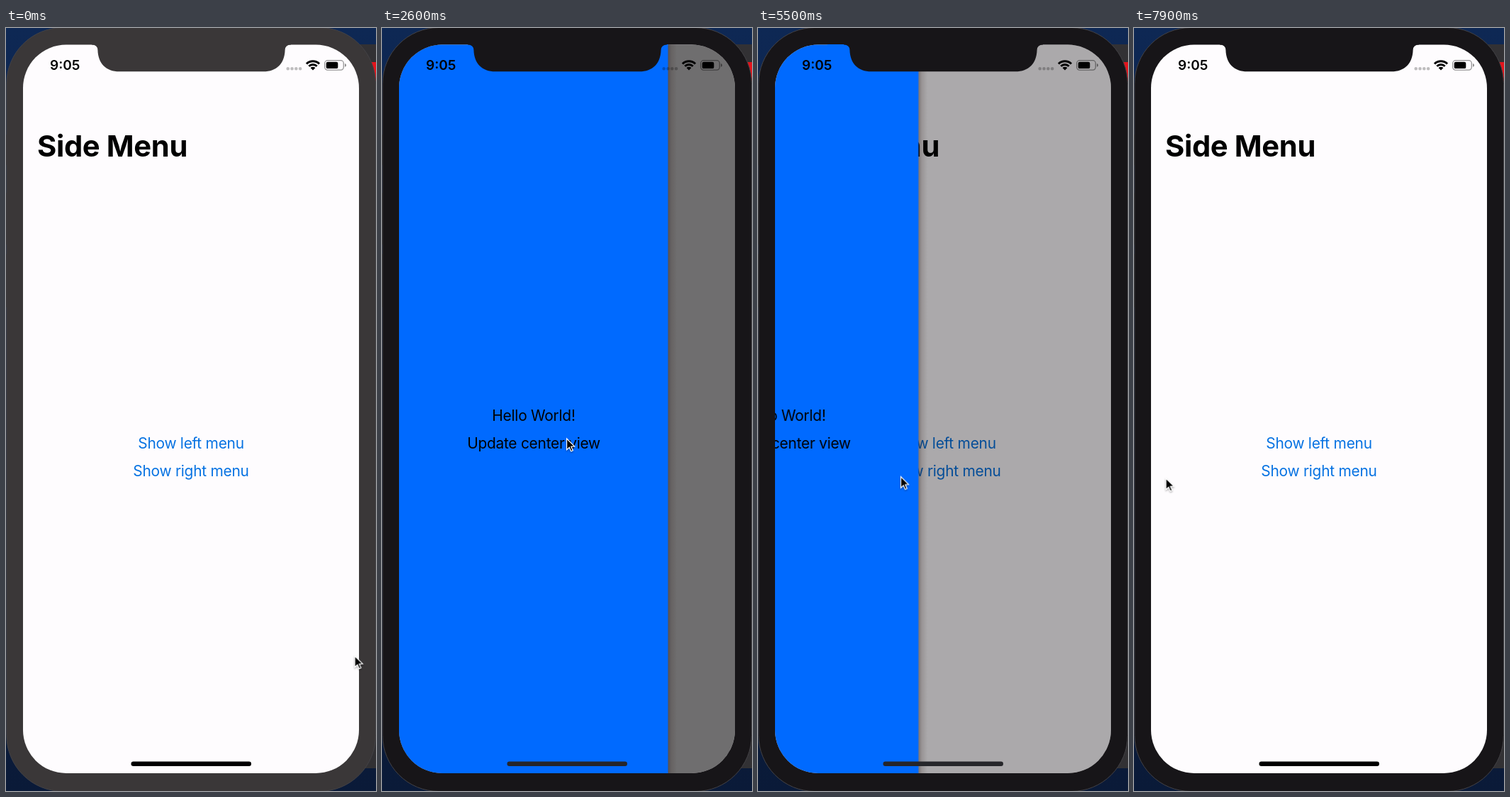
An HTML page that plays this animation: 522x1074 px, repeating every 8000 ms.

```html
<!DOCTYPE html>
<html lang="en">
<head>
<meta charset="utf-8">
<title>Side menu</title>
<style>
  html, body { margin: 0; width: 100%; height: 100%; overflow: hidden; background: #0b1d40; }
  svg { display: block; width: 522px; height: 1074px; font-family: Inter, "Open Sans", sans-serif; }
  .body { font-size: 20.9px; letter-spacing: -.25px; text-anchor: middle; }
  .link { fill: #0672e2; }

  .bezel, .menu, .dim, .home, .cursor { animation: 8s linear infinite; }
  .bezel  { animation-name: bezel; }
  .menu   { animation-name: menu; }
  .dim    { animation-name: dim; }
  .home   { animation-name: home; }
  .cursor { animation-name: cursor; }

  /* The window gains focus on the first click. */
  @keyframes bezel {
    0%, 26.24% { fill: #3a3738; }
    26.25%, 100% { fill: #171518; }
  }
  @keyframes menu {
    0%, 26.875% { transform: translateX(-396px); animation-timing-function: ease-in-out; }
    31.25%, 56.25% { transform: translateX(0); }
    68.75% { transform: translateX(-177px); }
    78.75% { transform: translateX(-323px); }
    83.75% { transform: translateX(-358px); animation-timing-function: ease-out; }
    87.5%, 100% { transform: translateX(-396px); }
  }
  @keyframes dim {
    0%, 26.875% { opacity: 0; animation-timing-function: ease-in-out; }
    31.25%, 56.25% { opacity: .56; }
    68.75% { opacity: .328; }
    78.75% { opacity: .098; }
    83.75% { opacity: .04; animation-timing-function: ease-out; }
    87.5%, 100% { opacity: 0; }
  }
  @keyframes home {
    0%, 26.875% { fill: #000; }
    31.25%, 68.75% { fill: #26262a; }
    78.75%, 100% { fill: #000; }
  }
  @keyframes cursor {
    0%, 4% { transform: translate(491.5px, 883px); animation-timing-function: ease-in-out; }
    19%, 43.75% { transform: translate(260px, 577px); animation-timing-function: ease-in-out; }
    51.25%, 55% { transform: translate(418px, 629px); }
    68.75% { transform: translate(201px, 630.5px); }
    78.75% { transform: translate(78.5px, 632px); }
    83.75%, 100% { transform: translate(44.5px, 633px); }
  }
</style>
</head>
<body>
<svg viewBox="0 0 522 1074">
  <defs>
    <linearGradient id="desk" x2="0" y2="1">
      <stop stop-color="#0e2854"/>
      <stop offset="1" stop-color="#0a1a38"/>
    </linearGradient>
    <linearGradient id="shade">
      <stop stop-color="#38241f" stop-opacity=".42"/>
      <stop offset=".4" stop-color="#38241f" stop-opacity=".15"/>
      <stop offset="1" stop-color="#38241f" stop-opacity="0"/>
    </linearGradient>
    <clipPath id="screen"><rect x="24" y="23.5" width="474" height="1025.5" rx="61"/></clipPath>
    <clipPath id="fan"><path d="M433 59.5 418 44.5V40H448V44.5Z"/></clipPath>
    <filter id="soft" x="-50%" y="-50%" width="200%" height="200%">
      <feDropShadow dx="0" dy="1.5" stdDeviation="1.2" flood-opacity=".35"/>
    </filter>
  </defs>

  <!-- Desktop and the window behind -->
  <rect width="522" height="1074" fill="url(#desk)"/>
  <path d="M460 23H522V1042H460Z" fill="#323134"/>
  <path d="M514 48H522V75H514Z" fill="#e3141c"/>
  <path d="M0 150V193M0 232V305M0 318V393M522 230V355" stroke="#151517" stroke-width="3"/>

  <!-- Phone -->
  <rect class="bezel" x=".8" y="-.5" width="520.7" height="1075" rx="79" stroke="#434246" stroke-width="1"/>

  <g clip-path="url(#screen)">
    <rect x="24" y="23" width="474" height="1027" fill="#fefcfe"/>
    <text x="44" y="180.5" font-size="41.7" font-weight="700" letter-spacing="-.35">Side Menu</text>
    <g class="body link">
      <text x="261" y="591.5">Show left menu</text>
      <text x="261" y="630.5">Show right menu</text>
    </g>
    <rect class="dim" x="24" y="23" width="474" height="1027"/>

    <g class="menu">
      <rect x="403" y="23" width="13" height="1027" fill="url(#shade)"/>
      <rect x="20" y="23" width="383.5" height="1027" fill="#006aff"/>
      <g class="body">
        <text x="214" y="552.5">Hello World!</text>
        <text x="214" y="591.5">Update center view</text>
      </g>
    </g>

    <!-- Status bar -->
    <text x="62" y="59" font-size="19" font-weight="600">9:05</text>
    <path d="M397.7 57.3h.01M403.5 57.3h.01M409.3 57.3h.01M415.1 57.3h.01" stroke="#000" stroke-opacity=".25" stroke-width="4.6" stroke-linecap="round"/>
    <g clip-path="url(#fan)" fill="none" stroke="#000">
      <circle cx="433" cy="59.5" r="12.8" stroke-width="3"/>
      <circle cx="433" cy="59.5" r="8" stroke-width="2.8"/>
      <circle cx="433" cy="59.5" r="2.4" stroke-width="4.8"/>
    </g>
    <rect x="449.7" y="45.7" width="26.6" height="13.4" rx="4" fill="none" stroke="#000" stroke-opacity=".42" stroke-width="1.3"/>
    <path d="M478 50q2 .5 2 2.4t-2 2.4Z" fill-opacity=".45"/>
    <rect x="451.7" y="47.7" width="16.6" height="9.4" rx="2.2"/>

    <rect class="home" x="176.5" y="1032.5" width="169.5" height="6.4" rx="3.2"/>
  </g>

  <path class="bezel" d="M121 22V23.5Q129 23.5 129.4 31C130 50 141 61.3 160 61.3H363C382 61.3 393 50 393.6 31Q394 23.5 402 23.5V22Z"/>

  <g class="cursor">
    <path d="M.6 1V16.6L4.3 13.2 6.8 18.8 9.3 17.7 6.9 12.2 11.6 11.9Z" stroke="#fff" stroke-width="1.2" filter="url(#soft)"/>
  </g>
</svg>
</body>
</html>
```
